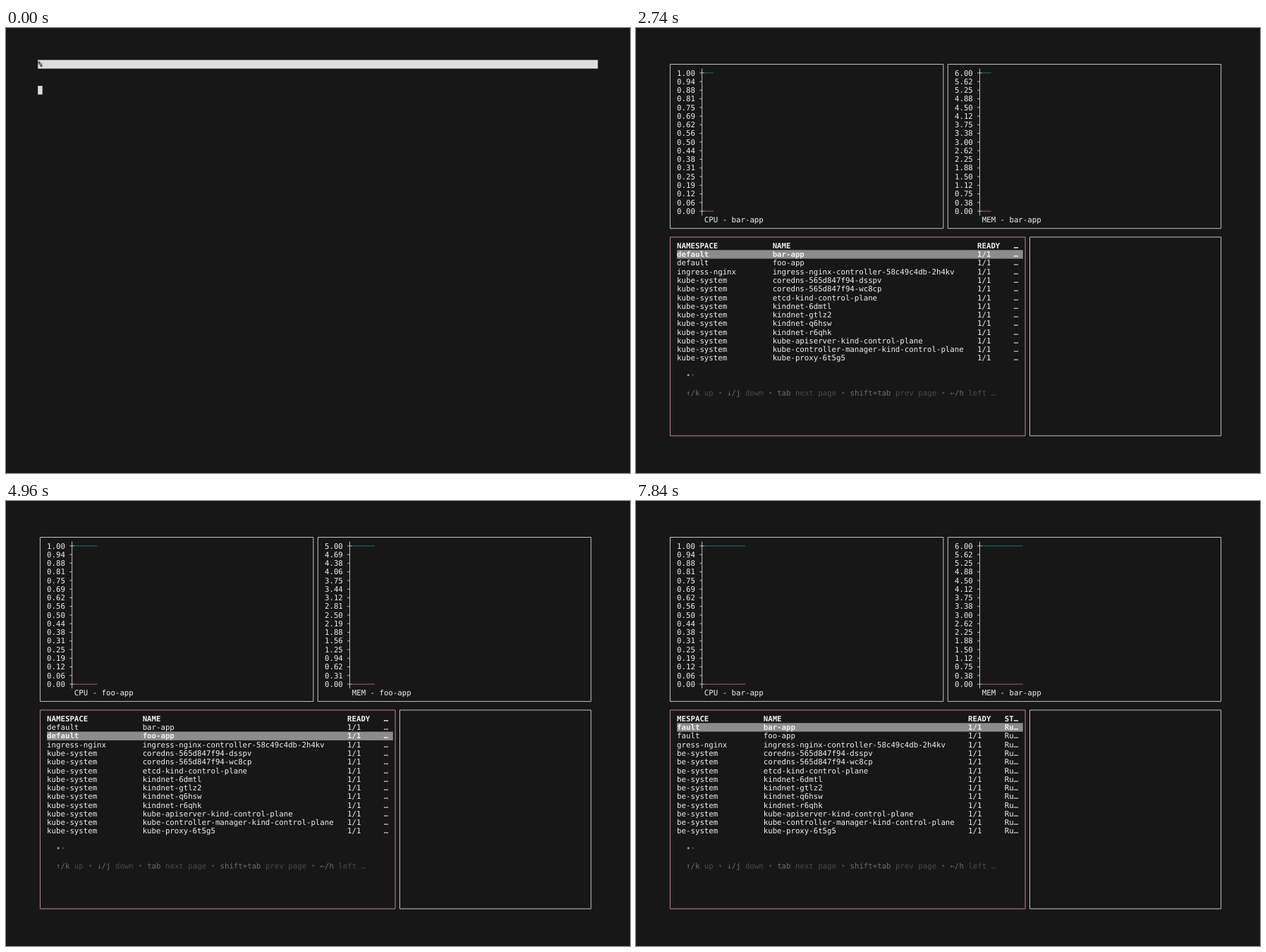
Recreate the animation shown at these times as an HTML page. Size 885x632 px, loop 8000 ms.

```html
<!DOCTYPE html>
<html lang="en">
<head>
<meta charset="utf-8">
<title>Terminal</title>
<style>
  html, body { margin: 0; width: 100%; height: 100%; overflow: hidden; background: #171717; }
  svg { display: block; width: 885px; height: 632px; }
  text {
    font-family: "DejaVu Sans Mono", monospace;
    font-size: 10.725px;
    text-rendering: geometricPrecision;
  }
</style>
</head>
<body>
<svg id="stage" viewBox="0 0 885 632"></svg>
<script>
const stage = document.getElementById('stage');
const LOOP = 8000;
const CW = 6.457, RH = 12.27, LEFT = 45.2, TOP = 45.4;
const FG = '#dddddd', BRIGHT = '#f0f0f0', BG = '#171717';
const BORDER = '#c4c4c4', FOCUS = '#c98496', TEAL = '#1c7474', RED = '#b5606f';

const COMMAND = 'kubectl topui pods -A';
const TICKS = [2000, 2740, 3480, 4240, 4960, 5660, 6400, 7120, 7840];
const HINTS = [['↑/k', 'up'], ['↓/j', 'down'], ['tab', 'next page'],
  ['shift+tab', 'prev page'], ['←/h', 'left']];

const system = name => ({ ns: 'kube-system', name });
const PODS = [
  { ns: 'default', name: 'bar-app', cpu: () => 1, mem: () => 6 },
  { ns: 'default', name: 'foo-app', cpu: () => 1, mem: () => 5 },
  { ns: 'ingress-nginx', name: 'ingress-nginx-controller-58c49c4db-2h4kv',
    cpu: k => k < 4 ? 2 : 3, mem: () => 128 },
  ...['coredns-565d847f94-dsspv', 'coredns-565d847f94-wc8cp', 'etcd-kind-control-plane',
    'kindnet-6dmtl', 'kindnet-gtlz2', 'kindnet-q6hsw', 'kindnet-r6qhk',
    'kube-apiserver-kind-control-plane', 'kube-controller-manager-kind-control-plane',
    'kube-proxy-6t5g5'].map(system)
];

// Character grid to pixels
const px = col => +(LEFT + col * CW).toFixed(2);
const py = row => +(TOP + row * RH).toFixed(2);
const midX = col => px(col + 0.5);
const midY = row => py(row + 0.5);

function text(col, row, str, fill = BRIGHT, bold = false) {
  const safe = str.replace(/>/g, '&gt;').replace(/ /g, '\u00a0');
  return `<text x="${px(col)}" y="${(midY(row) + 3.71).toFixed(2)}" fill="${fill}"` +
    `${bold ? ' font-weight="700"' : ''}>${safe}</text>`;
}

function block(col, row, cols, fill = FG) {
  return `<rect x="${px(col)}" y="${py(row)}" width="${cols * CW}" height="${RH}" fill="${fill}"/>`;
}

function line(d, stroke) {
  return `<path d="${d}" fill="none" stroke="${stroke}" stroke-width="1"/>`;
}

function panel(c0, r0, c1, r1, stroke) {
  return line(`M${midX(c0)} ${midY(r0)}H${midX(c1)}V${midY(r1)}H${midX(c0)}Z`, stroke);
}

// Fixed decimals, ties to even
function fixed(v, digits) {
  const scaled = v * 10 ** digits;
  let n = Math.round(scaled);
  if (scaled % 1 === 0.5 && n % 2) n--;
  return (n / 10 ** digits).toFixed(digits);
}

function chart(col, title, value, cells) {
  const data = Array.from({ length: cells + 1 }, (_, k) => value(k));
  const max = Math.max(...data);
  const digits = max > 100 ? 0 : 2;
  const width = fixed(max, digits).length;
  const axis = col + width + 1;
  const rowOf = v => 1 + Math.round((1 - v / max) * 16);
  let out = '';
  let d = `M${midX(axis)} ${py(1)}V${py(18)}`;
  for (let i = 0; i <= 16; i++) {
    out += text(col, i + 1, fixed(max * (16 - i) / 16, digits).padStart(width));
    const cross = i === 16 || i + 1 === rowOf(data[0]);
    d += `M${px(axis)} ${midY(i + 1)}H${cross ? px(axis + 1) : midX(axis)}`;
  }
  out += line(d, BORDER);
  const plot = (values, stroke) => {
    let p = `M${px(axis + 1)} ${midY(rowOf(values[0]))}`;
    for (let k = 1; k < values.length; k++) {
      p += `H${midX(axis + k)}V${midY(rowOf(values[k]))}H${px(axis + k + 1)}`;
    }
    return line(p, stroke);
  };
  if (cells) out += plot(data, TEAL) + plot(data.map(() => 0), RED);
  return out + text(axis + 1, 18, title);
}

function tableLine(ns, name, ready, status, shift) {
  const full = ns.padEnd(21) + name.padEnd(45) + ready.padEnd(8) + status;
  return full.slice(shift, shift + 74) + '…';
}

function table(selected, t) {
  const shiftAt = lag => (t >= 6600 + lag) + (t >= 6840 + lag);
  let out = text(2, 21, tableLine('NAMESPACE', 'NAME', 'READY', 'STATUS', shiftAt(0)), BRIGHT, true);
  PODS.forEach((pod, i) => {
    const on = i === selected, row = 22 + i;
    const lag = i === PODS.length - 1 ? 20 : 0;
    if (on) out += block(2, row, 76, '#8c8c8a');
    out += text(2, row, tableLine(pod.ns, pod.name, '1/1', 'Running', shiftAt(lag)), BRIGHT, on);
  });
  out += text(4, 36, '•', '#979797') + text(5, 36, '•', '#3c3c3c');
  let col = 4;
  for (const [key, label] of HINTS) {
    out += text(col, 38, key, '#6c6c6c');
    col += key.length + 1;
    out += text(col, 38, label, '#4a4a4a');
    col += label.length + 1;
    out += text(col, 38, key === '←/h' ? '…' : '•', '#444444');
    col += 2;
  }
  return out;
}

function shell(t) {
  let out = block(0, 0, 123) + text(0, 0, '%', BG, true);
  if (t < 20) return out + block(0, 3, 1);
  const typed = Math.min(COMMAND.length, 1 + Math.floor((t - 20) / 32));
  out += text(0, 1, '>', '#5a56e0') + text(2, 1, COMMAND.slice(0, typed), FG);
  if (t >= 1160) return out + block(0, 2, 1);
  const blinkOff = t >= 820 && t < 980;
  return blinkOff ? out : out + block(2 + typed, 1, 1);
}

function pick(t, lag) {
  if (t < 3180) return 0;
  if (t < 3440) return 1;
  if (t < 4900 + lag) return 2;
  return t < 5140 ? 1 : 0;
}

function dashboard(t) {
  let out = panel(0, 0, 60, 19, BORDER) + panel(61, 0, 121, 19, BORDER) +
    panel(0, 20, 78, 43, FOCUS) + panel(79, 20, 121, 43, BORDER);
  if (t < 1320) return out;
  const cells = TICKS.filter(at => t >= at).length;
  const pod = PODS[pick(t, 0)];
  out += chart(2, 'CPU - ' + pod.name, pod.cpu, cells);
  out += chart(63, 'MEM - ' + pod.name, pod.mem, cells);
  return out + table(pick(t, 20), t);
}

function scene(t) {
  if (t < 1220) return shell(t);
  return t < 1280 ? '' : dashboard(t);
}

let shown = null;
function render(t) {
  const markup = `<rect width="885" height="632" fill="${BG}"/>` + scene(t);
  if (markup !== shown) stage.innerHTML = shown = markup;
}

const start = performance.now();
function frame() {
  render((performance.now() - start) % LOOP);
  requestAnimationFrame(frame);
}
render(0);
requestAnimationFrame(frame);
</script>
</body>
</html>
```
